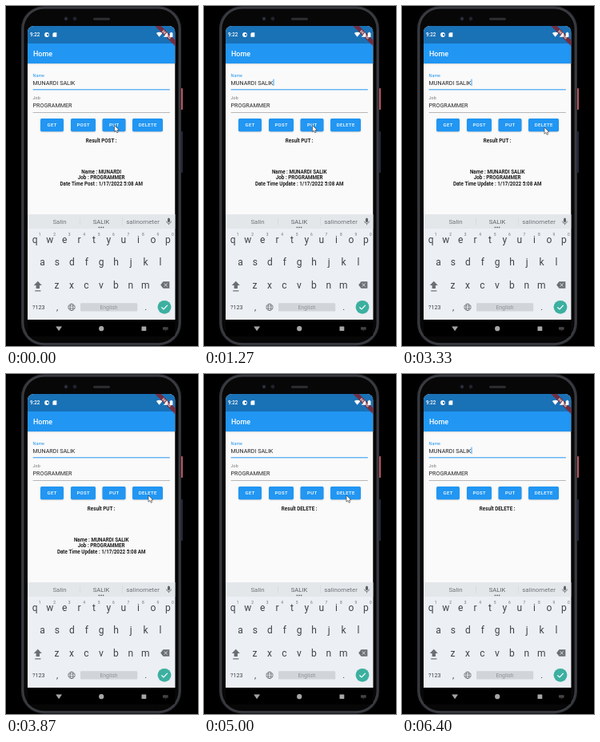
Write an HTML page with a canvas that moves like this. It is 240x426 px and loops after 6.47 s.

```html
<!DOCTYPE html>
<html lang="en">
<head>
<meta charset="utf-8">
<title>Request demo</title>
<style>
html, body { margin: 0; width: 100%; height: 100%; overflow: hidden; background: #000; }
canvas { display: block; width: 240px; height: 426px; }
</style>
</head>
<body>
<canvas id="stage"></canvas>
<script>
const W = 240, H = 426, LOOP = 6470;
const FONT = 'Roboto, "Liberation Sans", sans-serif';
const BLUE = '#2196f3', KEY = '#3f4448', BOARD = '#eceff3';
const canvas = document.getElementById('stage');
const ctx = canvas.getContext('2d');
const ratio = window.devicePixelRatio || 1;
canvas.width = W * ratio;
canvas.height = H * ratio;

const FIRST = 'MUNARDI', FULL = 'MUNARDI SALIK';

// time, x, y of the pointer tip
const PATH = [
  [0, 135.5, 149.5], [2130, 135.5, 149.5], [2400, 125, 134], [2700, 125, 134],
  [3200, 178, 152], [5500, 178, 152], [6200, 160, 440], [LOOP, 160, 440]
];

function rect(x, y, w, h, color) {
  ctx.fillStyle = color;
  ctx.fillRect(x, y, w, h);
}

function round(x, y, w, h, r, color) {
  ctx.beginPath();
  ctx.roundRect(x, y, w, h, r);
  ctx.fillStyle = color;
  ctx.fill();
}

function disc(x, y, r, color) {
  ctx.beginPath();
  ctx.arc(x, y, r, 0, Math.PI * 2);
  ctx.fillStyle = color;
  ctx.fill();
}

function poly(points, color) {
  ctx.beginPath();
  points.forEach(([x, y]) => ctx.lineTo(x, y));
  ctx.closePath();
  ctx.fillStyle = color;
  ctx.fill();
}

function line(points, color, width) {
  ctx.beginPath();
  points.forEach(([x, y]) => ctx.lineTo(x, y));
  ctx.strokeStyle = color;
  ctx.lineWidth = width;
  ctx.stroke();
}

function text(str, x, y, size, color, weight = 400, align = 'left', spacing = 0) {
  ctx.font = `${weight} ${size}px ${FONT}`;
  ctx.textAlign = align;
  ctx.letterSpacing = spacing + 'px';
  ctx.fillStyle = color;
  ctx.fillText(str, x, y);
}

function drawPhone() {
  rect(0, 0, W, H, '#000');
  round(217, 103, 4, 27, 1, '#b8545c');
  round(217, 157, 4, 52, 1, '#22263a');
  round(19, 0.3, 200, 425.2, 28, '#30323a');
  round(20.6, 1.8, 196.8, 422.2, 26.6, '#3c3e42');
  round(22.4, 3.6, 193.2, 418.6, 25, '#070708');
  round(109, 14.8, 21, 3, 1.5, '#2c2e31');
  disc(75, 16, 2.4, '#20232c');
  disc(86, 16, 2.4, '#20232c');
  disc(75, 16, 0.9, '#3b4258');
}

function drawStatus() {
  text('9:22', 30, 38.3, 6.3, '#fff', 500);
  disc(51, 36, 2.9, '#fff');
  disc(52.1, 36, 1.2, '#1971b6');
  poly([[59.8, 33.2], [63.3, 33.2], [63.3, 38.8], [58.4, 38.8], [58.4, 34.6]], '#fff');
  poly([[191.6, 38.8], [187.8, 34], [189.6, 33.1], [191.6, 32.8], [193.6, 33.1], [195.4, 34]], '#fff');
  poly([[196.7, 38.8], [202, 33.3], [202, 38.8]], '#fff');
  round(204.8, 33.6, 3.6, 5.4, 0.5, '#fff');
  rect(205.8, 32.8, 1.6, 1, '#fff');
}

function drawBanner() {
  ctx.save();
  ctx.translate(211.5, 25);
  ctx.rotate(Math.PI / 4);
  rect(-18, 12.5, 36, 5.4, 'rgba(140,26,32,.76)');
  text('DEBUG', 0, 16.8, 4.4, '#e8dcdc', 900, 'center');
  ctx.restore();
}

function drawButton(label, x, w) {
  ctx.save();
  ctx.shadowColor = 'rgba(0,0,0,.25)';
  ctx.shadowBlur = 1.5 * ratio;
  ctx.shadowOffsetY = 0.6 * ratio;
  round(x, 141, w, 16.2, 1.8, BLUE);
  ctx.restore();
  text(label, x + w / 2 + 0.2, 151.3, 6, '#fff', 500, 'center', 0.35);
}

function drawForm(t) {
  text('Name', 33.6, 88.7, 5.4, BLUE);
  text(FULL, 33.6, 98.5, 7.16, '#202124');
  const end = 33.6 + ctx.measureText(FULL).width;
  const phase = t % 1000;
  if (phase >= 130 && phase < 630) rect(end + 0.2, 91.6, 0.9, 8.4, BLUE);
  rect(33.6, 104.3, 171.2, 1, BLUE);
  text('Job', 33.6, 117.1, 5.4, '#757575');
  text('PROGRAMMER', 33.6, 126.9, 7.16, '#202124');
  rect(33.6, 133.2, 171.2, 0.6, '#8b8b8b');
  [['GET', 43, 29], ['POST', 81, 31], ['PUT', 120.5, 29], ['DELETE', 158, 38]]
    .forEach(b => drawButton(...b));
}

function drawResult(t) {
  const put = t >= 700, del = t >= 4450;
  const bold = (str, y) => text(str, 119.2, y, 6.27, '#1c1c1c', 700, 'center');
  bold(`Result ${del ? 'DELETE' : put ? 'PUT' : 'POST'} :`, 170.5);
  if (del) return;
  bold('Name : ' + (put ? FULL : FIRST), 210.2);
  bold('Job : PROGRAMMER', 217.4);
  bold(`Date Time ${put ? 'Update' : 'Post'} : 1/17/2022 5:08 AM`, 224.7);
}

function drawStrip() {
  rect(27, 261, 184.5, 18, '#e4e7ea');
  text('Salin', 67, 273.2, 7.9, '#70757a', 400, 'center');
  text('SALIK', 119, 273.2, 7.6, '#5c6166', 400, 'center');
  text('salinometer', 171, 273.2, 7.9, '#70757a', 400, 'center');
  rect(92.5, 265, 0.5, 10, '#ced2d6');
  rect(145, 265, 0.5, 10, '#ced2d6');
  for (let i = -1; i <= 1; i++) disc(119 + i * 2.6, 277.3, 0.9, '#62676c');
  round(202, 265.4, 3, 5.6, 1.5, '#5f6368');
  ctx.beginPath();
  ctx.arc(203.5, 269.5, 2.9, 0, Math.PI);
  ctx.strokeStyle = '#5f6368';
  ctx.lineWidth = 0.8;
  ctx.stroke();
  rect(203.1, 272.2, 0.8, 2, '#5f6368');
}

function keyRow(keys, x, y, hints) {
  [...keys].forEach((k, i) => {
    const cx = x + i * 18.45;
    text(k, cx, y, 12, KEY, 400, 'center');
    if (hints) text((i + 1) % 10, cx + 6, y - 9.4, 4.9, '#6c7278', 400, 'center');
  });
}

function drawGlobe(x, y) {
  ctx.strokeStyle = '#5f6368';
  ctx.lineWidth = 0.7;
  for (const rx of [4.2, 1.9]) {
    ctx.beginPath();
    ctx.ellipse(x, y, rx, 4.2, 0, 0, Math.PI * 2);
    ctx.stroke();
  }
  for (const d of [-1.5, 1.5]) line([[x - 3.9, y + d], [x + 3.9, y + d]], '#5f6368', 0.7);
}

function drawKeyboard() {
  rect(27, 261, 184.5, 132, BOARD);
  drawStrip();
  keyRow('qwertyuiop', 36.2, 297, true);
  keyRow('asdfghjkl', 45.4, 325.3);
  keyRow('zxcvbnm', 63.6, 353.7);

  poly([[39.8, 344.8], [44.8, 350], [42, 350], [42, 354], [37.6, 354], [37.6, 350], [34.8, 350]], '#6a6f74');
  rect(36.2, 356.3, 7.2, 1.2, '#6a6f74');
  poly([[193.2, 349.5], [196.4, 345.3], [204.3, 345.3], [204.3, 353.7], [196.4, 353.7]], '#6a6f74');
  line([[197.6, 347.4], [201.8, 351.6]], BOARD, 0.9);
  line([[201.8, 347.4], [197.6, 351.6]], BOARD, 0.9);

  text('?123', 40.8, 380, 7.2, KEY, 400, 'center');
  text(',', 64, 380.5, 11, KEY, 400, 'center');
  drawGlobe(82, 377.4);
  round(93, 372.2, 71.2, 10.4, 1.2, '#d1d4d8');
  text('English', 128.5, 379.7, 6.8, '#8f9499', 400, 'center');
  text('.', 174.8, 380.5, 11, KEY, 400, 'center');
  disc(198, 377.3, 8.4, '#3cb0a0');
  line([[194.4, 377.5], [197, 380], [201.8, 374.9]], '#fff', 1.2);
}

function drawNav() {
  rect(27, 393, 184.5, 21, '#000');
  poly([[62.2, 401.4], [70, 401.4], [66.1, 407.2]], '#a6a6a6');
  disc(119.2, 404.2, 3.1, '#a6a6a6');
  round(169.5, 401.5, 5.8, 5.6, 0.6, '#a6a6a6');
  round(196, 402.3, 6.6, 3.5, 0.5, '#444');
  poly([[198, 406.4], [200.6, 406.4], [199.3, 407.6]], '#444');
}

function drawPointer(t) {
  const i = PATH.findIndex(p => p[0] > t);
  const [t0, x0, y0] = PATH[i - 1], [t1, x1, y1] = PATH[i];
  const k = (t - t0) / (t1 - t0), e = k * k * (3 - 2 * k);
  ctx.save();
  ctx.translate(x0 + (x1 - x0) * e, y0 + (y1 - y0) * e);
  poly([[0, 0], [0, 8.2], [1.9, 6.5], [3.2, 9.3], [4.6, 8.7], [3.4, 6], [5.9, 5.9]], '#fff');
  ctx.strokeStyle = '#444';
  ctx.lineWidth = 0.7;
  ctx.stroke();
  ctx.restore();
}

function draw(t) {
  ctx.setTransform(ratio, 0, 0, ratio, 0, 0);
  drawPhone();
  ctx.save();
  ctx.beginPath();
  ctx.roundRect(27, 25, 184.5, 389, [8, 8, 3, 3]);
  ctx.clip();
  rect(27, 25, 184.5, 368, '#fafafa');
  rect(27, 25, 184.5, 22, '#1971b6');
  rect(27, 47, 184.5, 25, BLUE);
  const shade = ctx.createLinearGradient(0, 72, 0, 74);
  shade.addColorStop(0, 'rgba(0,0,0,.14)');
  shade.addColorStop(1, 'rgba(0,0,0,0)');
  rect(27, 72, 184.5, 2, shade);
  text('Home', 34, 62.7, 8.95, '#fff', 500);
  drawBanner();
  drawStatus();
  drawForm(t);
  drawResult(t);
  drawKeyboard();
  drawNav();
  ctx.restore();
  drawPointer(t);
}

const start = performance.now();
function tick() {
  draw((performance.now() - start) % LOOP);
  requestAnimationFrame(tick);
}
tick();
</script>
</body>
</html>
```
